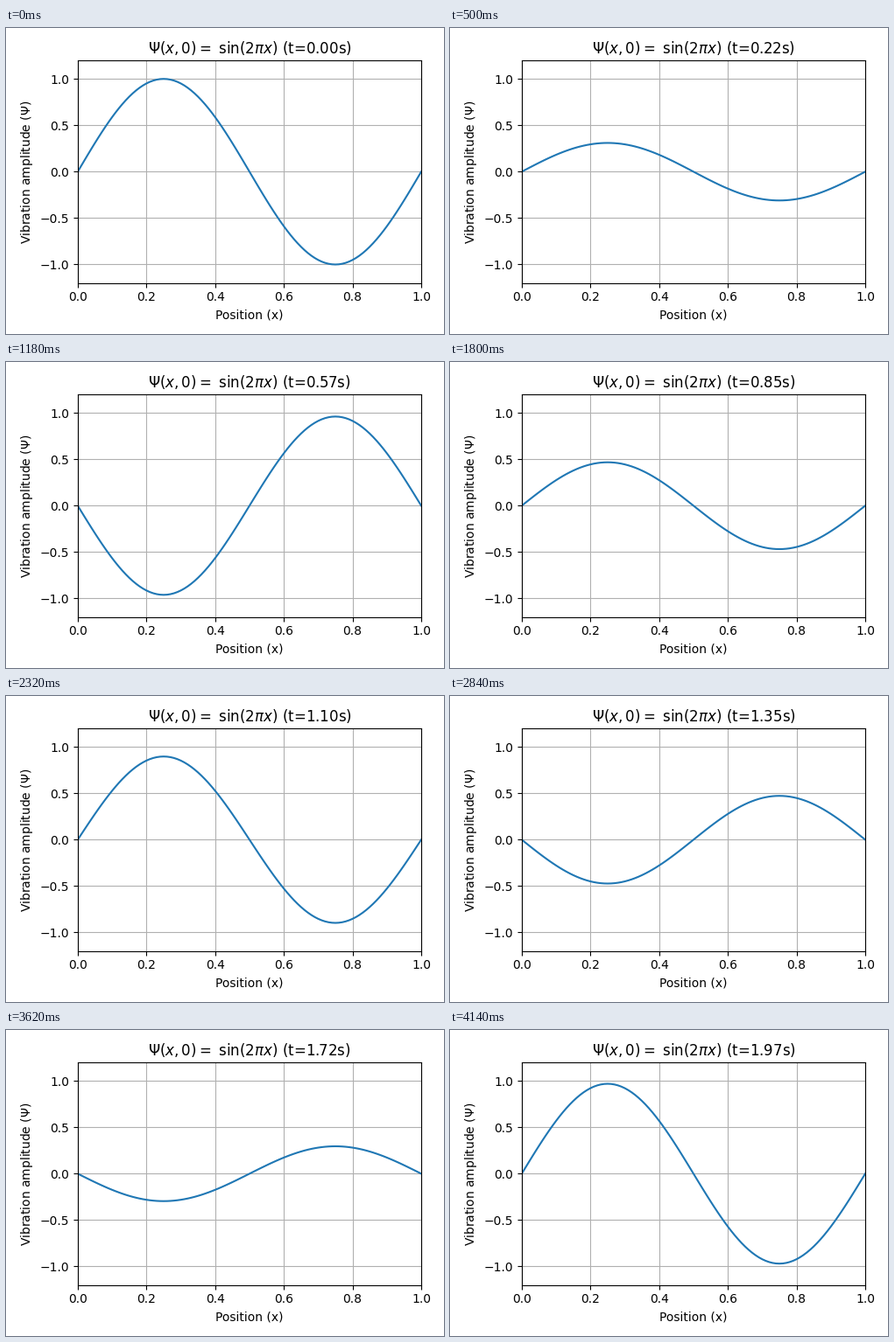
A matplotlib script for the animation above (4160 ms loop, 500 px wide and 350 px high).

```python
import numpy as np
import matplotlib.pyplot as plt
from matplotlib.animation import FuncAnimation

TICK = 20                          # ms per drawn frame
HOLDS = [20, 100, 20, 100, 20]     # repeating hold times, ms
STEPS = 80
RATE, LAG = 0.02504, 0.0249        # wave cycles per step, starting phase

# Step shown at each tick
holds = np.tile(HOLDS, STEPS // len(HOLDS)) // TICK
schedule = np.repeat(np.arange(STEPS), holds)

x = np.linspace(0, 1, 101)
mode = np.sin(2 * np.pi * x)


def amplitude(step):
    return np.cos(2 * np.pi * (RATE * step - LAG)) / np.cos(2 * np.pi * LAG)


def heading(step):
    t = step * 5 // 2 / 100        # 0.025 s per step, cut to two decimals
    return rf"$\Psi(x,0)=$ sin(2$\pi x$) (t={t:.2f}s)"


fig, ax = plt.subplots(figsize=(5, 3.5), dpi=100)
line, = ax.plot(x, mode)
title = ax.set_title(heading(0))
ax.set(xlim=(0, 1), ylim=(-1.2, 1.2),
       xlabel="Position (x)", ylabel=r"Vibration amplitude ($\Psi$)")
ax.grid()
fig.tight_layout()
fig.subplots_adjust(top=1 - 37 / 350)


def update(tick):
    step = schedule[tick]
    line.set_ydata(amplitude(step) * mode)
    title.set_text(heading(step))
    return line, title


anim = FuncAnimation(fig, update, frames=len(schedule), interval=TICK,
                     repeat=True, repeat_delay=0, blit=False)
plt.show()
```
